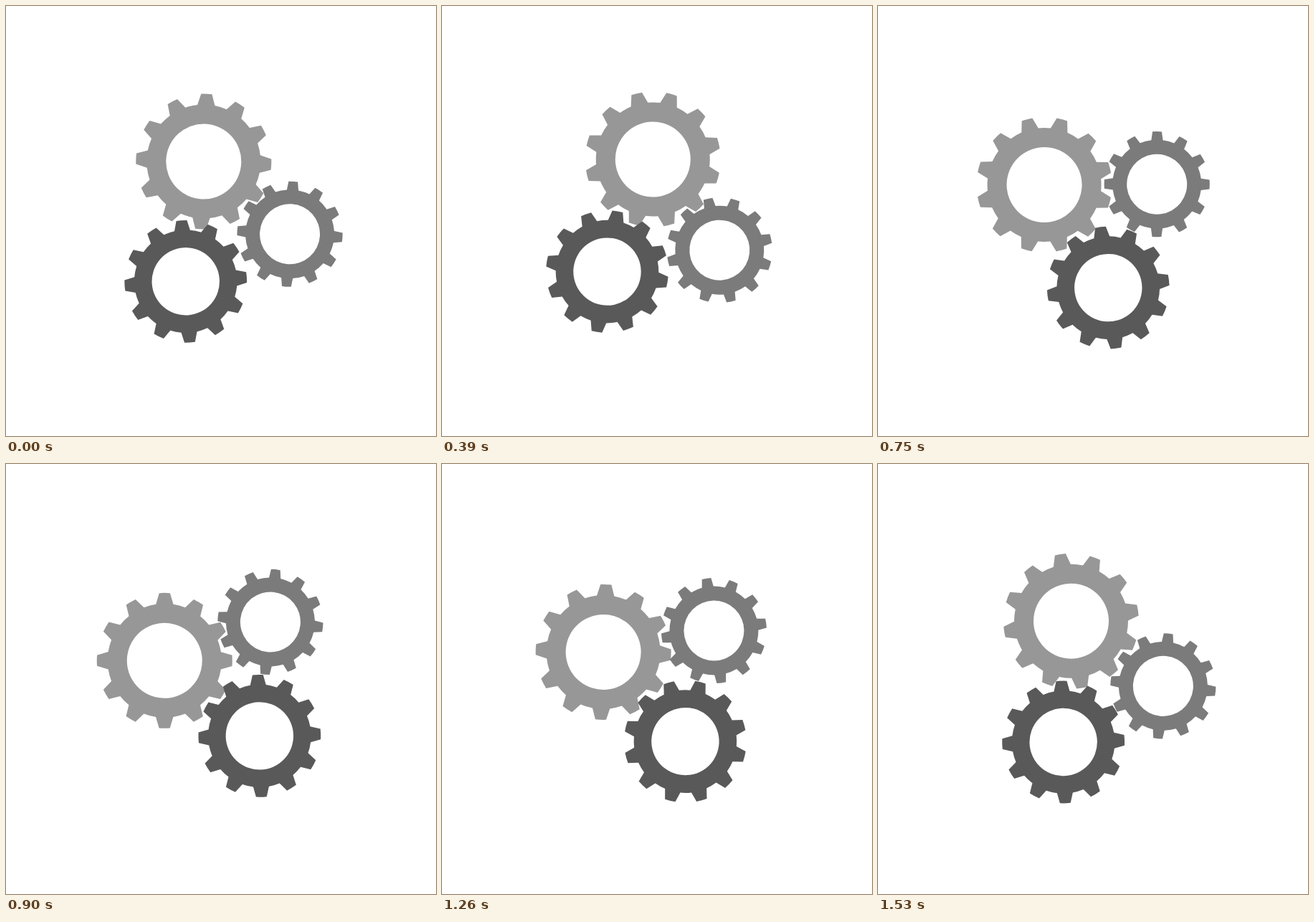
Recreate the animation shown at these times as an HTML page. Size 600x600 px, loop 1560 ms.

```html
<!DOCTYPE html>
<html lang="en">
<head>
<meta charset="utf-8">
<title>Gears</title>
<style>
  html, body { margin: 0; width: 100%; height: 100%; overflow: hidden; background: #fff; }
  svg { display: block; width: 100vw; height: 100vh; }
</style>
</head>
<body>
<svg viewBox="0 0 600 600"><g id="swing"></g></svg>
<script>
const LOOP = 1560, STEP = 30;
const PIVOT = [298, 292.8];
const TEETH = 12;

// tip and base are half angles of a tooth in degrees; turns is revolutions per loop
const GEARS = [
  { x: 276, y: 217, outer: 94.5, root: 79.5, hole: 52.5, tip: 4.6, base: 8.8, phase: 2.65, turns: 1, fill: '#979797' },
  { x: 396, y: 318.5, outer: 73.6, root: 62, hole: 42, tip: 5, base: 7.5, phase: 3.8, turns: -1, fill: '#7b7b7b' },
  { x: 250.5, y: 384.2, outer: 85.4, root: 71.8, hole: 47.2, tip: 5, base: 8.8, phase: -3.7, turns: -1, fill: '#595959' }
];

const swing = document.getElementById('swing');

function polar(r, deg) {
  const a = deg * Math.PI / 180;
  return (r * Math.sin(a)).toFixed(2) + ' ' + (-r * Math.cos(a)).toFixed(2);
}

function arc(r, deg) {
  return `A${r} ${r} 0 0 1 ${polar(r, deg)}`;
}

function gearPath({ outer, root, hole, tip, base }) {
  const pitch = 360 / TEETH;
  let d = 'M' + polar(root, -base);
  for (let i = 0; i < TEETH; i++) {
    const a = i * pitch;
    d += 'L' + polar(outer, a - tip) + arc(outer, a + tip)
       + 'L' + polar(root, a + base) + arc(root, a + pitch - base);
  }
  return d + 'Z M' + polar(hole, 0) + arc(hole, 180) + arc(hole, 360) + 'Z';
}

for (const gear of GEARS) {
  gear.el = document.createElementNS('http://www.w3.org/2000/svg', 'path');
  gear.el.setAttribute('d', gearPath(gear));
  gear.el.setAttribute('fill', gear.fill);
  gear.el.setAttribute('fill-rule', 'evenodd');
  swing.appendChild(gear.el);
}

const smooth = u => u * u * (3 - 2 * u);

// The group swings through 90 degrees: 810 ms back, 750 ms forth
function swingAngle(t) {
  const high = 21.6, range = 90, start = 240, fall = 810;
  const s = (t - start + LOOP) % LOOP;
  return s < fall
    ? high - range * smooth(s / fall)
    : high - range + range * smooth((s - fall) / (LOOP - fall));
}

function draw(time) {
  const t = Math.floor((time % LOOP) / STEP) * STEP;
  swing.setAttribute('transform', `rotate(${swingAngle(t)} ${PIVOT})`);
  for (const g of GEARS) {
    const spin = g.phase + g.turns * 360 * t / LOOP;
    g.el.setAttribute('transform', `translate(${g.x} ${g.y}) rotate(${spin})`);
  }
}

let origin = null;
function tick(now) {
  if (origin === null) origin = now;
  draw(Math.max(0, now - origin));
  requestAnimationFrame(tick);
}
draw(0);
requestAnimationFrame(tick);
</script>
</body>
</html>
```
